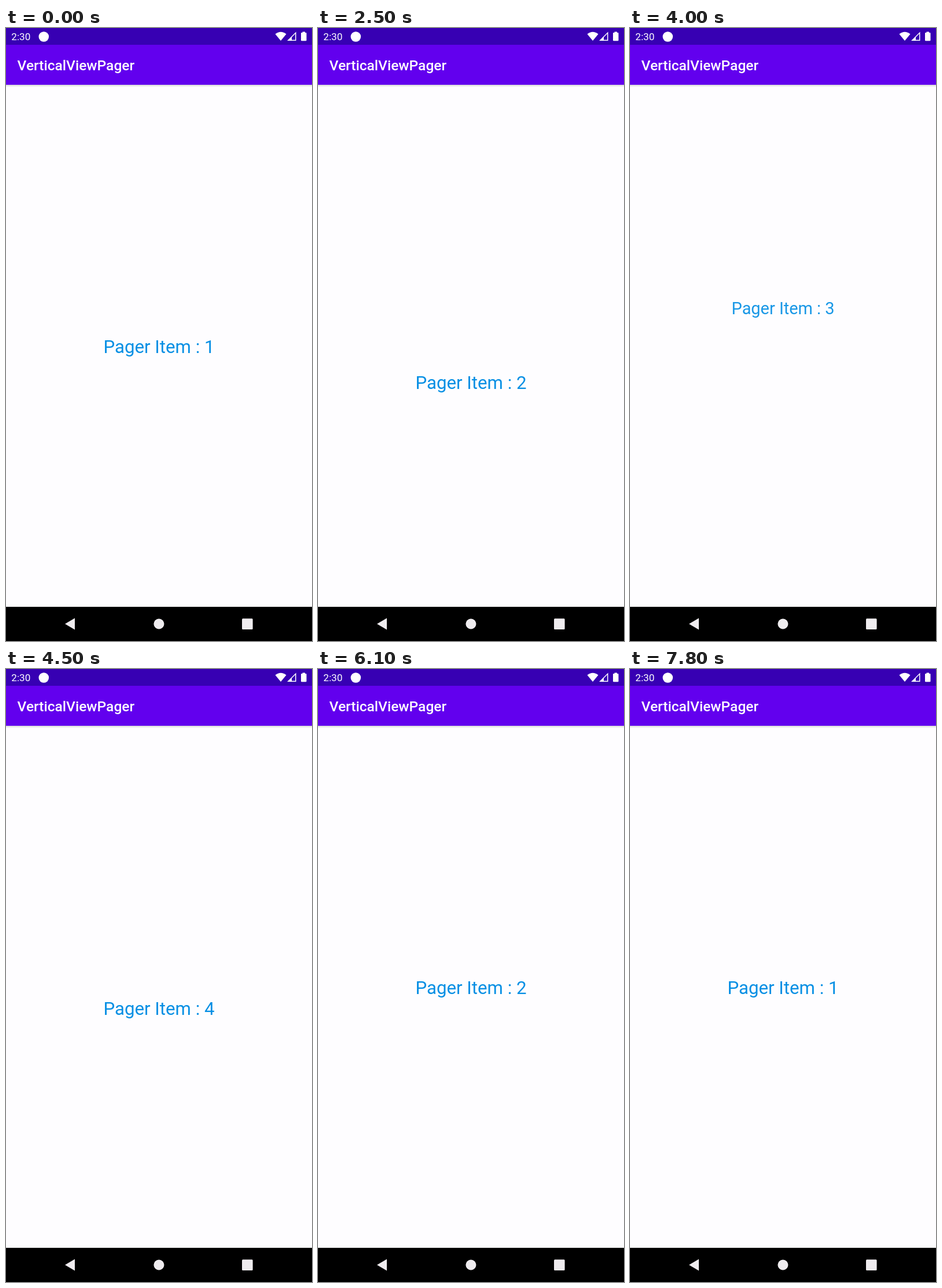
Recreate the animation shown at these times as an HTML page. Size 529 by 1058 pixels, loop 7.9 s.

```html
<!DOCTYPE html>
<html lang="en">
<head>
<meta charset="utf-8">
<title>VerticalViewPager</title>
<style>
  html, body { margin: 0; width: 100%; height: 100%; overflow: hidden; background: #fefdff; }
  svg { display: block; width: 529px; height: 1058px; font-family: Roboto, sans-serif; }
  .page { font-size: 31.2px; fill: #068fe4; text-anchor: middle; }
  .title { font-size: 24.5px; font-weight: 500; fill: #fff; }
  .clock { font-size: 17.15px; fill: #fff; }
</style>
</head>
<body>
<svg viewBox="0 0 529 1058">
  <defs>
    <linearGradient id="shade" x2="0" y2="1">
      <stop stop-color="#000" stop-opacity=".16"/>
      <stop offset="1" stop-color="#000" stop-opacity="0"/>
    </linearGradient>
  </defs>
  <rect width="529" height="1058" fill="#fefdff"/>
  <g id="pages"></g>

  <rect y="98" width="529" height="4" fill="url(#shade)"/>
  <rect y="29" width="529" height="69" fill="#6200ee"/>
  <rect width="529" height="29" fill="#3700b3"/>
  <text class="title" x="19.6" y="73">VerticalViewPager</text>
  <text class="clock" x="9.3" y="21">2:30</text>
  <g fill="#fff">
    <circle cx="65.3" cy="15" r="8.8"/>
    <path d="M475 22 465.5 10.5Q475 3 484.500 10.500Z"/>
    <path d="M486 22 501.500 6.500V22ZM494 20.500H500V10.100L494 16.100Z" fill-rule="evenodd"/>
    <path d="M512.500 6.500H517V8H518.200Q519.500 8 519.500 9.300V21Q519.500 22.300 518.200 22.300H511.300Q510 22.300 510 21V9.300Q510 8 511.300 8H512.500Z"/>
  </g>

  <rect y="999" width="529" height="59" fill="#000"/>
  <g fill="#efecef">
    <path d="M102 1028.500 119 1018.500V1038.500Z"/>
    <circle cx="264.400" cy="1028.500" r="9"/>
    <rect x="408" y="1019.300" width="18.600" height="18.600" rx="1.500"/>
  </g>
</svg>
<script>
const LOOP = 7900, STEP = 100;
const CENTER_X = 264.5, CENTER_Y = 548.6, PAGE_HEIGHT = 901, MIN_SCALE = 0.75;

// Swipes: start ms, end ms, page left, page reached
const swipes = [
  [1240, 2740, 1, 2],
  [3156, 3806, 2, 3],
  [3884, 4584, 3, 4],
  [4800, 5400, 4, 3],
  [5450, 6050, 3, 2],
  [6650, 7200, 2, 1]
];

const pages = [1, 2, 3, 4].map(number => {
  const text = document.createElementNS("http://www.w3.org/2000/svg", "text");
  text.setAttribute("class", "page");
  text.setAttribute("y", 12.2);
  text.textContent = "Pager Item : " + number;
  document.getElementById("pages").append(text);
  return { number, text };
});

const smooth = s => s * s * (3 - 2 * s);

function scrollAt(time) {
  let scroll = 1;
  for (const [start, end, from, to] of swipes) {
    if (time < start) break;
    scroll = from + (to - from) * smooth(Math.min(1, (time - start) / (end - start)));
  }
  return scroll;
}

// Pages above the centre shrink and fade; those below keep full size.
function draw(time) {
  const scroll = scrollAt(time);
  for (const { number, text } of pages) {
    const offset = number - scroll;
    const rest = 1 + Math.min(0, offset);
    const y = CENTER_Y + offset * PAGE_HEIGHT;
    text.setAttribute("transform", `translate(${CENTER_X} ${y}) scale(${Math.max(MIN_SCALE, rest)})`);
    text.setAttribute("opacity", Math.max(0, rest));
  }
}

const origin = performance.now();
function tick() {
  const time = (performance.now() - origin) % LOOP;
  draw(Math.floor(time / STEP) * STEP);
  requestAnimationFrame(tick);
}
tick();
</script>
</body>
</html>
```
